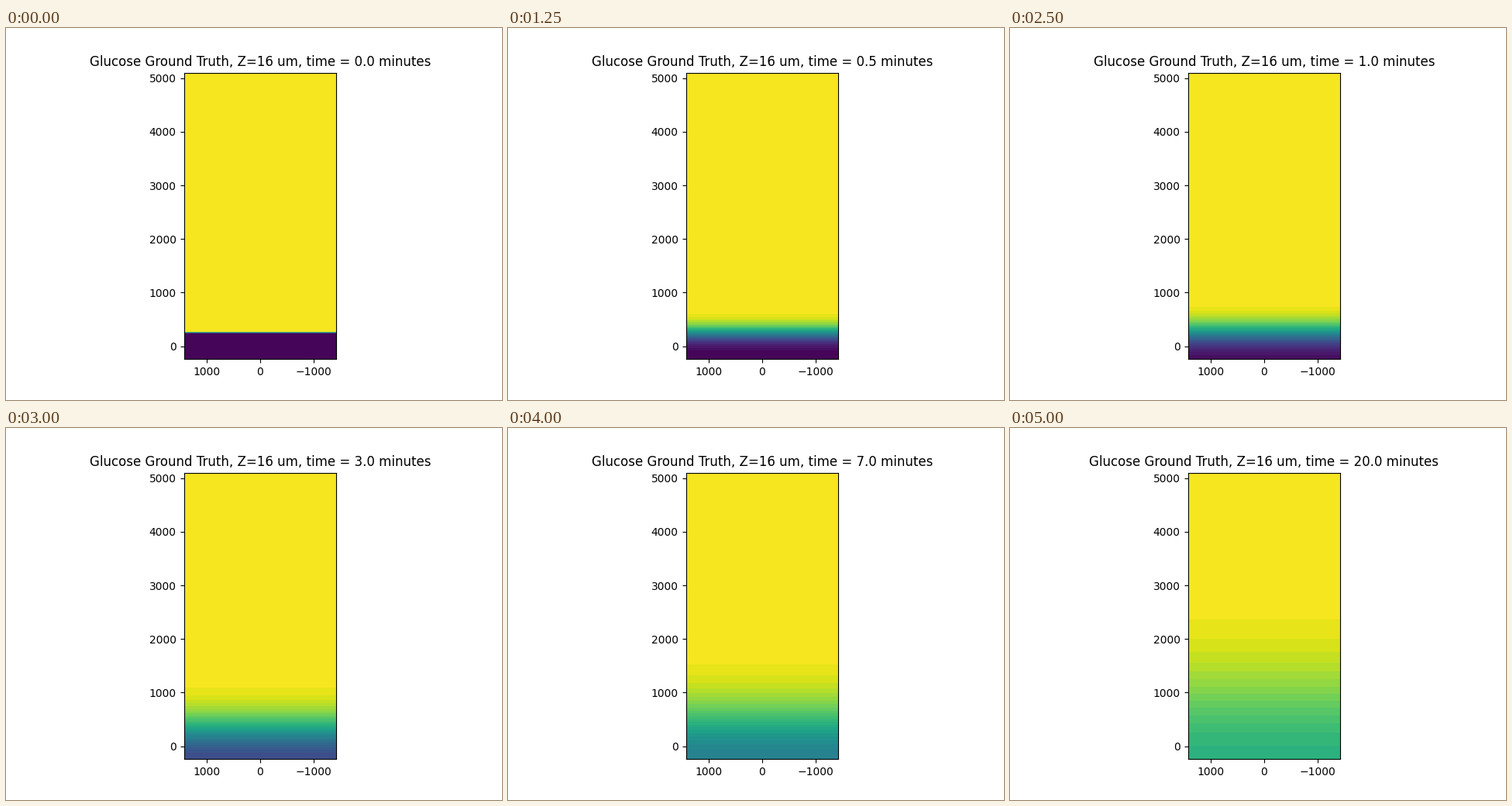
Write a matplotlib script that moves like this. It is 640 by 480 pixels and loops after 5250 ms.

```python
import math

import numpy as np
import matplotlib.pyplot as plt
from matplotlib.animation import FuncAnimation

D = 30000.0        # diffusion coefficient, um^2 / min
STEP = 32          # voxel size, um
FLOOR = -256       # closed wall below the gel
SURFACE = 256      # gel / medium interface
LEVELS = np.linspace(0, 1, 41)

# minutes: tenths up to one, whole minutes up to ten, then twenty
TIMES = [i / 10 for i in range(11)] + list(range(2, 11)) + [20]

x = np.array([-1424, 1424])
y = np.arange(-240, 5105, STEP)
erf = np.vectorize(math.erf)


def glucose(t):
    """Relative concentration over y, diffusing into an empty closed layer."""
    if t == 0:
        return np.where(y > SURFACE, 1.0, 0.0)
    depth = SURFACE - FLOOR
    s = y - FLOOR
    w = 2 * math.sqrt(D * t)
    u = 1 - 0.5 * (erf((depth - s) / w) + erf((depth + s) / w))
    return np.clip(u, 0, 1)


fig, ax = plt.subplots(figsize=(6.4, 4.8), dpi=100)


def draw(i):
    t = TIMES[i]
    ax.clear()
    field = np.column_stack([glucose(t)] * 2)
    ax.contourf(x, y, field, levels=LEVELS, cmap="viridis")
    ax.set_aspect("equal")
    ax.set_xlim(x[1], x[0])
    ax.set_ylim(y[0], y[-1])
    ax.set_xticks([1000, 0, -1000])
    ax.set_yticks(range(0, 5001, 1000))
    ax.set_title(f"Glucose Ground Truth, Z=16 um, time = {t:.1f} minutes")
    return []


anim = FuncAnimation(fig, draw, frames=len(TIMES), init_func=lambda: draw(0),
                     interval=250, repeat=True, repeat_delay=0, blit=False)
plt.show()
```
